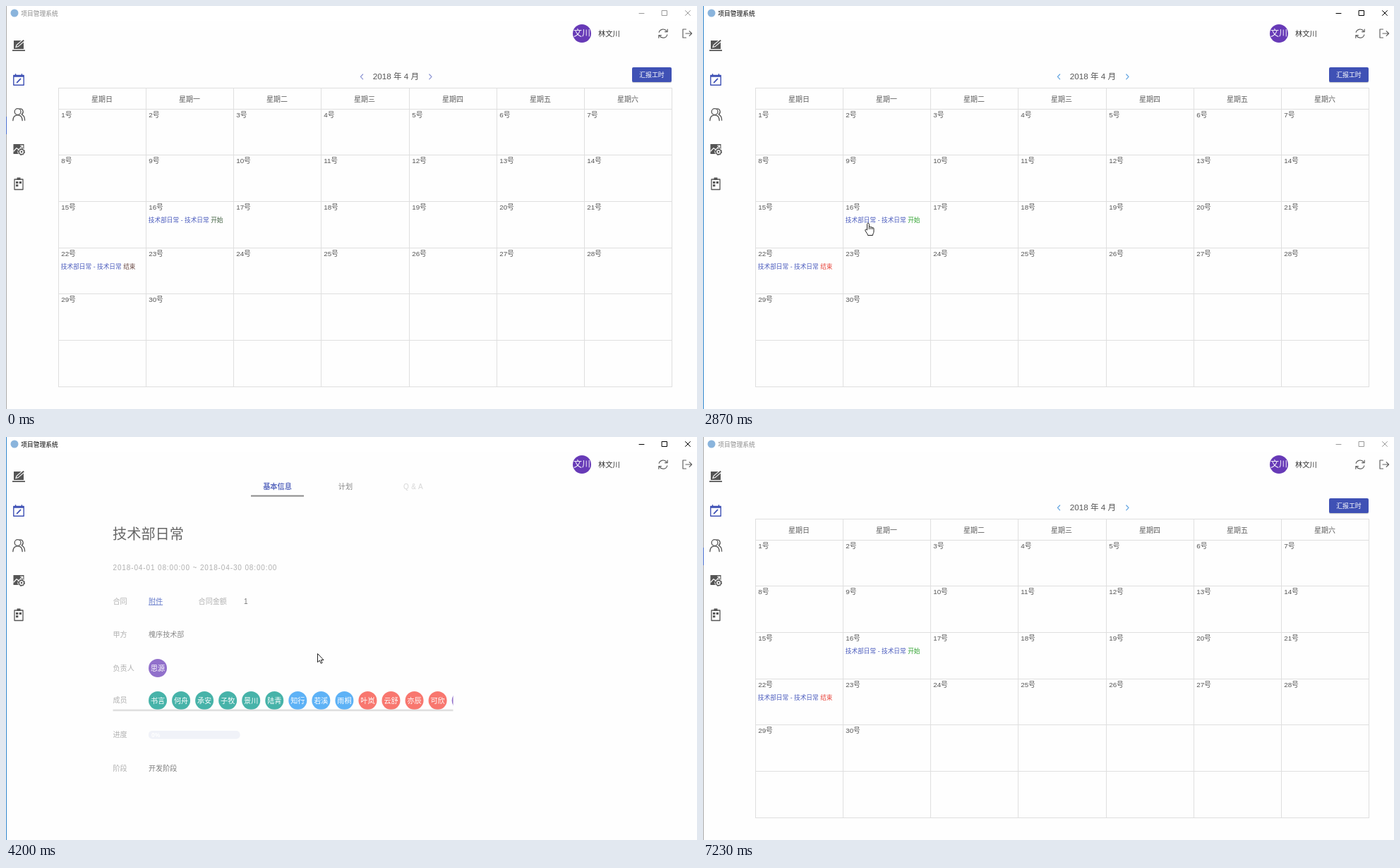
These frames come from a looping animation (979 by 572 pixels, 7320 ms). An HTML page:

```html
<!DOCTYPE html>
<html lang="zh-CN">
<head>
<meta charset="utf-8">
<title>项目管理系统</title>
<style>
html, body { margin: 0; width: 100%; height: 100%; overflow: hidden; background: #fff; }
svg { display: block; width: 100vw; height: 100vh; }
text { font-family: "Liberation Sans", "Noto Sans CJK SC", "Noto Sans CJK", sans-serif; white-space: pre; }
.line { fill: none; stroke-linecap: round; stroke-linejoin: round; }
</style>
</head>
<body>
<svg id="stage" viewBox="0 0 979 572">
  <rect width="979" height="572" fill="#fefefe"/>
  <rect width="979" height="21.5" fill="#fff"/>
  <rect id="edge" width="1" height="572"/>
  <rect id="edgeMark" y="157" width="1" height="25" fill="#4a6fd0"/>
  <rect id="hover" x="1" y="85" width="34" height="40" fill="#eaf3fe"/>

  <circle id="logo" cx="12" cy="10" r="5.5" fill="#8ab4dc"/>
  <g id="winButtons" class="line" stroke-width="1">
    <path d="M897 10.5H904M929.5 6.5H936.5V13.5H929.5ZM962.5 6.5L969.5 13.5M969.5 6.5L962.5 13.5"/>
  </g>

  <g id="user">
    <circle cx="816" cy="39" r="13" fill="#673ab7"/>
  </g>
  <g class="line" stroke="#616161" stroke-width="1.2">
    <path d="M925.2 37.2A6 6 0 0 1 936 35.8M936.8 40.8A6 6 0 0 1 926 42.4"/>
    <path d="M937.2 33V36.6H933.6M924.8 45.2V41.6H928.4"/>
    <path d="M963.5 33H959V45H963.5M963 39H971.5M968.2 35.6L971.6 39L968.2 42.4"/>
  </g>

  <g id="sidebar" fill="#555" stroke="#555" stroke-width="0">
    <path d="M11 49H25V61H11ZM9 62.3H27V64H9Z"/>
    <path d="M14 58.5L15 55.4L24.6 47.2L26.6 49.4L17.2 57.6Z" stroke="#fff" stroke-width="1.1"/>
    <g class="line" stroke="#3f51b5" stroke-width="1.4">
      <path d="M10.8 98.5H25.2V112.3H10.8ZM10.8 100H25.2M13.6 96.6V99M22.4 96.6V99"/>
      <path d="M15.6 108.6L20.6 103.4" stroke-width="1.7"/>
    </g>
    <g class="line" stroke-width="1.3">
      <circle cx="16.6" cy="150" r="4.4"/>
      <path d="M9.8 162.6C10 157.6 12.6 154.9 16.6 154.9S23 157.6 23.2 162.6M19.6 145.9C24.4 145.6 25.8 151.4 22.2 153.9C25 155.2 26.6 158.2 26.6 162.2"/>
    </g>
    <path d="M10.5 196H25.5V210H10.5Z"/>
    <path class="line" d="M11 206L15 201.6L18 204L23.4 198.4M20.6 198H23.8V201.2" stroke="#fff" stroke-width="1.2"/>
    <circle cx="22" cy="207" r="5.6" fill="#fff"/>
    <circle class="line" cx="22" cy="207" r="3.6" stroke-width="1.5"/>
    <circle class="line" cx="22" cy="207" r="4.6" stroke-width="1" stroke-dasharray="1.4 2.2"/>
    <circle cx="22" cy="207" r="1.3"/>
    <path class="line" d="M12 246H24V260.5H12Z" stroke-width="1.3"/>
    <path d="M15.5 243.6H20.5V247H15.5ZM14 249H17.3V252H14ZM18.7 249H22V252H18.7ZM14 253.2H17.3V256.2H14Z"/>
  </g>

  <g id="calendar">
    <g class="line" id="arrows" stroke-width="1.2">
      <path d="M505.6 97L502.4 100.4L505.6 103.8"/>
      <path id="next" d="M599.8 97L603 100.4L599.8 103.8"/>
    </g>
    <rect x="887" y="88" width="56" height="21.2" rx="2" fill="#000" opacity=".18"/>
    <rect x="887" y="87" width="56" height="21" rx="2" fill="#3f51b5"/>
  </g>

  <g id="detail">
    <rect x="347" y="82.6" width="75" height="2" fill="#757575"/>
    <clipPath id="strip"><rect x="151" y="355" width="482.5" height="40"/></clipPath>
    <g id="chips" clip-path="url(#strip)"></g>
    <rect x="151.5" y="386.6" width="482" height="2.6" fill="#dadada"/>
    <rect x="202" y="417" width="129.5" height="11.4" rx="5" fill="#eef0f7"/>
  </g>

  <g id="loading">
    <rect x="1" y="21.5" width="978" height="550.5" fill="#000" opacity=".157"/>
    <path d="M474 303H505V309C505 317 500 321 494 321H485C479 321 474 317 474 309Z" fill="#fff"/>
    <path class="line" d="M504 306.6H508.4C513.6 306.6 513.6 315.6 508 315.6H503" stroke="#fff" stroke-width="1.8"/>
    <path d="M474 323H507V325H474Z" fill="#fff" opacity=".7"/>
    <path class="line" d="M481 301C477 298 484 296.500 480 293M488.500 301C484.500 298 491.500 296 487.500 292M496 301C492 298 499 296.500 495 293" stroke="#fff" stroke-width="1.3" opacity=".5"/>
  </g>

  <g id="cursor" fill="#fff" stroke="#222" stroke-width="1" stroke-linejoin="round">
    <path id="arrow" d="M0 0V12.200L2.800 9.600L4.700 13.800L6.600 13L4.800 9H8.500Z"/>
    <path id="hand" d="M-1.500 10V1.500C-1.500-.3 1.300-.3 1.300 1.500V6C1.500 4.700 3.700 4.800 3.800 6.300C4.300 5.300 6 5.600 6 7C6.600 6.200 8 6.600 8 8V12C8 14.500 6.500 15 6.500 17.500H-.5C-.5 15.500-2.500 14-4 11C-4.800 9.200-3.200 8.300-1.500 10ZM1.300 6V9M3.800 6.500V9M6 7.200V9"/>
  </g>
</svg>
<script>
const LOOP = 7320;
const $ = id => document.getElementById(id);

function add(parent, tag, attrs, text) {
  const el = document.createElementNS('http://www.w3.org/2000/svg', tag);
  for (const k in attrs) el.setAttribute(k, attrs[k]);
  if (text) el.textContent = text;
  parent.appendChild(el);
  return el;
}

// Places text by its vertical centre.
const label = (parent, x, cy, size, fill, text, more = {}) =>
  add(parent, 'text', { x, y: cy + size * 0.37, 'font-size': size, fill, ...more }, text);
const MID = { 'text-anchor': 'middle' };
const BOLD = { 'font-weight': 700 };

// Header
const title = label($('stage'), 21.2, 10.3, 8.75, '#000', '项目管理系统');
label($('user'), 816, 38.8, 12, '#fff', '文川', MID);
label($('user'), 839, 39.2, 10.3, '#333', '林文川', { 'font-weight': 500 });

// Calendar
const cal = $('calendar');
const colX = c => 74 + Math.round(124.14 * c);
const rowY = r => 146 + Math.floor(65.67 * r);
const month = label(cal, 552.5, 99.6, 11.65, '#555', '', MID);
label(cal, 915, 97.4, 8.9, '#fff', '汇报工时', { ...MID, 'font-weight': 500 });
let grid = 'M74 116.5H944';
for (let i = 0; i < 7; i++) grid += `M74 ${rowY(i) + .5}H944`;
for (let i = 0; i < 8; i++) grid += `M${colX(i) + .5} 116V541`;
add(cal, 'path', { d: grid, stroke: '#dfdfdf', fill: 'none' });
[...'日一二三四五六'].forEach((d, i) =>
  label(cal, colX(i) + 62, 132, 10, '#5c5c5c', '星期' + d, MID));

function buildMonth(first, days) {
  const g = add(cal, 'g', {});
  for (let d = 1; d <= days; d++) {
    const i = d - 1 + first;
    label(g, colX(i % 7) + 4.2, rowY(Math.floor(i / 7)) + 8.8, 9.8, '#555', d + '号');
  }
  return g;
}
const march = buildMonth(4, 31);
const april = buildMonth(0, 30);

function entry(col, row, word) {
  const el = label(april, colX(col) + 3.8, rowY(row) + 27, 8.7, '#4a5bbd', '技术部日常 - 技术日常 ');
  return add(el, 'tspan', {}, word);
}
const startWord = entry(1, 2, '开始');
const endWord = entry(0, 3, '结束');

// Project details
const detail = $('detail');
label(detail, 384.5, 69.8, 10.2, '#3f51b5', '基本信息', { ...MID, ...BOLD });
label(detail, 481, 69.8, 10.2, '#707070', '计划', MID);
label(detail, 577, 69.8, 10, '#cfcfcf', 'Q & A', { ...MID, 'letter-spacing': .4 });
label(detail, 151, 137.5, 20.2, '#4a4a4a', '技术部日常');
label(detail, 151.5, 185.3, 10, '#a2a2a2', '2018-04-01 08:00:00 ~ 2018-04-30 08:00:00', { 'letter-spacing': .87 });
[['合同', 233], ['甲方', 280.5], ['负责人', 328], ['成员', 373.5], ['进度', 422.5], ['阶段', 470]]
  .forEach(([s, y]) => label(detail, 151.5, y, 10.1, '#a2a2a2', s));
label(detail, 202, 233, 10.1, '#4a63c0', '附件', { 'text-decoration': 'underline' });
label(detail, 272.6, 233, 10.1, '#a2a2a2', '合同金额');
label(detail, 337, 233, 10.1, '#606060', '1');
label(detail, 202, 280.5, 10.1, '#757575', '槐序技术部');
label(detail, 202, 470, 10.1, '#666', '开发阶段');
label(detail, 206, 422.7, 8.5, '#fff', '0%', BOLD);

function chip(parent, x, y, fill, name) {
  add(parent, 'circle', { cx: x, cy: y, r: 13, fill });
  label(parent, x, y - .2, 10.1, '#fff', name, { ...MID, 'font-weight': 500 });
}
chip(detail, 215, 328, '#7e57c2', '思源');
const names = '书言 何舟 承安 子牧 景川 陆青 知行 若溪 雨桐 叶岚 云舒 亦辰 可欣 佳禾'.split(' ');
names.forEach((n, i) => {
  const fill = i < 6 ? '#26a69a' : i < 9 ? '#42a5f5' : i < 13 ? '#f75f55' : '#7e57c2';
  chip($('chips'), 215 + 33.05 * i, 374, fill, n);
});

label($('loading'), 468, 342.3, 10, '#fff', '加载中', BOLD);
label($('loading'), 501, 342.3, 10, '#fff', '. . .', { opacity: .5 });

// Runs of picture updates: first, last, count
const RUNS = [
  [70, 690, 9], [920, 1640, 10], [1870, 1870, 1], [2020, 2720, 10], [2780, 2870, 2],
  [3020, 3110, 2], [3580, 3580, 1], [3730, 4040, 5], [4130, 4200, 2], [4280, 4410, 2],
  [4820, 5530, 10], [5680, 5930, 4], [6000, 6400, 6], [6460, 6540, 2], [7230, 7230, 1]
];
// Pointer tip: time, x, y
const PATH = [
  [70, 818, 480], [540, 484, 85], [690, 504, 98], [1000, 504, 98], [1640, 599.5, 97.5],
  [2020, 599.5, 97.5], [2720, 232, 302], [2780, 233, 305], [2870, 234, 308], [3020, 235, 306],
  [3110, 236.5, 305], [3650, 236.5, 305], [3960, 441.5, 307.5], [4740, 441.5, 307.5],
  [5530, 18, 97], [5680, 20, 99], [5930, 35.5, 112.5], [6400, 655, 400], [6540, 674, 417]
];
const CAL_FADE = [[3650, 1], [3960, 0], [5930, 0], [6400, 1]];
const DETAIL_FADE = [[4040, 0], [4130, .04], [4200, .85], [4410, 1], [5600, 1], [5930, .02], [6000, 0]];

function snap(t) {
  let s = 0;
  for (const [a, b, n] of RUNS) {
    if (t < a) break;
    const gap = n > 1 ? (b - a) / (n - 1) : 1;
    s = Math.min(b, a + Math.floor((t - a) / gap + 1e-6) * gap);
  }
  return s;
}

const linear = u => u;
const smooth = u => u * u * (3 - 2 * u);

function track(keys, t, ease = linear, k = 1) {
  if (t <= keys[0][0]) return keys[0][k];
  for (let i = 1; i < keys.length; i++) {
    const [p, q] = [keys[i - 1], keys[i]];
    if (t <= q[0]) return p[k] + (q[k] - p[k]) * ease((t - p[0]) / (q[0] - p[0]));
  }
  return keys[keys.length - 1][k];
}

const show = (el, on) => { el.style.display = on ? '' : 'none'; };
const fade = (el, a) => { el.style.opacity = a; show(el, a > 0); };
const near = (v, a, b) => v >= a && v <= b;

function render(time) {
  const t = snap(time);
  const active = t >= 920 && t < 7230;
  title.setAttribute('fill', active ? '#000' : '#8a8a8a');
  $('winButtons').setAttribute('stroke', active ? '#000' : '#999');
  $('edge').setAttribute('fill', active ? '#2f86cc' : '#a9a9a9');
  show($('edgeMark'), !active);

  const isMarch = t >= 1000 && t < 2020;
  month.textContent = `2018 年 ${isMarch ? 3 : 4} 月`;
  show(march, isMarch);
  show(april, !isMarch);
  $('arrows').setAttribute('stroke', t < 920 ? '#8a93d2' : '#5fa3e0');
  show($('next'), !near(t, 1560, 1869));
  startWord.setAttribute('fill', t < 920 ? '#3f5f3f' : '#2fa12f');
  endWord.setAttribute('fill', t < 920 ? '#6b4a45' : '#e8453c');
  fade(cal, t < 3650 ? 1 : track(CAL_FADE, t));
  fade(detail, track(DETAIL_FADE, t));
  show($('loading'), t >= 4130 && t < 4200);

  const x = track(PATH, t, smooth, 1), y = track(PATH, t, smooth, 2);
  const inMenu = x < 40 && near(y, 85, 125);
  const onPager = near(y, 94, 106) && (near(x, 498, 509) || near(x, 595, 608));
  const onEntry = near(t, 2640, 3809) && near(x, 202, 288) && near(y, 298, 311);
  const hand = inMenu || onPager || onEntry;
  show($('cursor'), t >= 70 && t < 7230);
  show($('hand'), hand);
  show($('arrow'), !hand);
  show($('hover'), inMenu && active);
  $('cursor').setAttribute('transform', `translate(${x} ${y})`);
}

const begin = performance.now();
function frame() {
  render((performance.now() - begin) % LOOP);
  requestAnimationFrame(frame);
}
frame();
</script>
</body>
</html>
```
